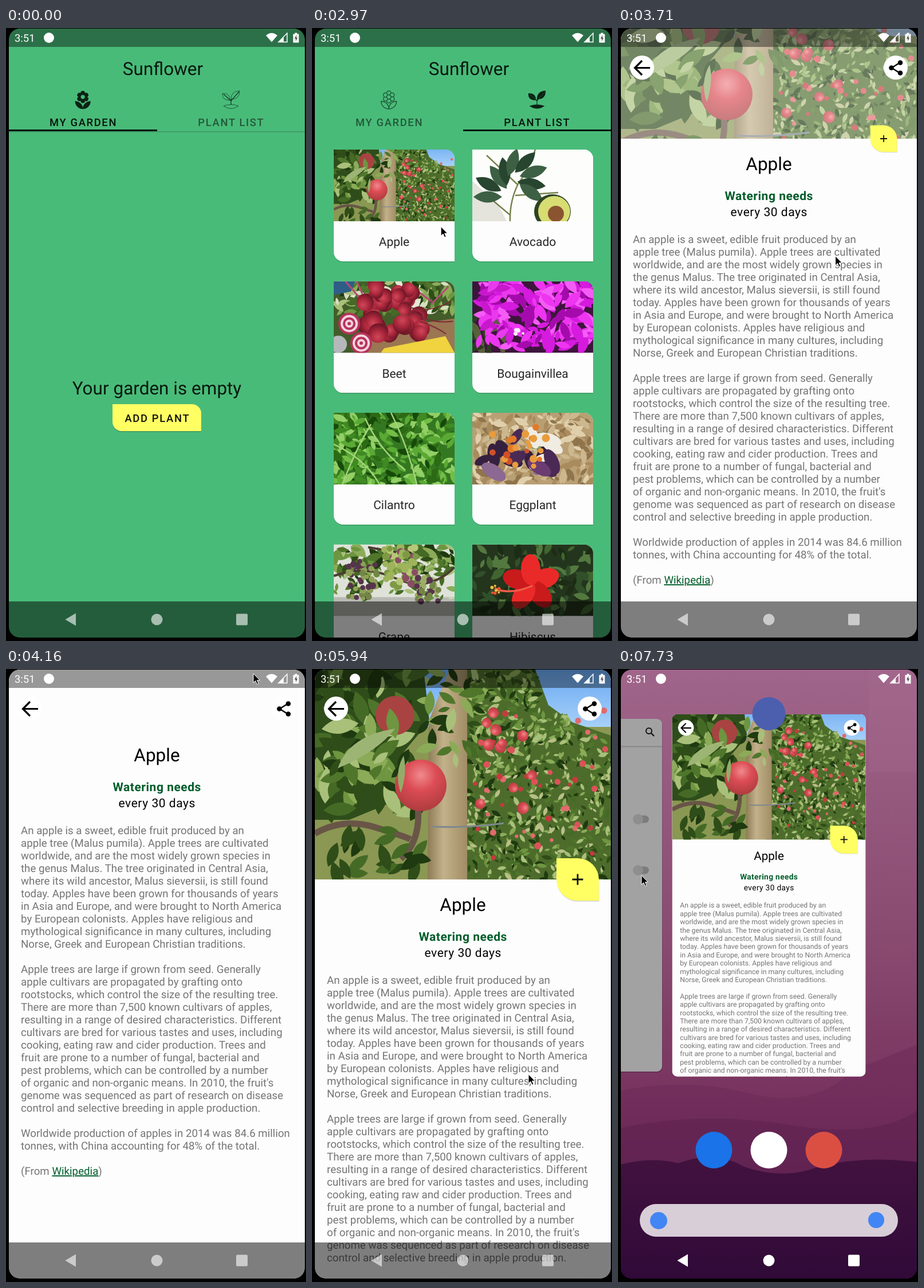
Write an HTML page that moves like this. It is 524 px wide and 1069 px high and loops after 8000 ms.

```html
<!DOCTYPE html>
<html lang="en">
<head>
<meta charset="utf-8">
<title>Garden app</title>
<style>
html, body { margin: 0; width: 100%; height: 100%; overflow: hidden; background: #000; }
svg { display: block; }
text { font-family: Roboto, "Noto Sans", sans-serif; text-rendering: geometricPrecision; }
.caps { font-size: 18.4px; font-weight: 500; letter-spacing: 1.65px; text-anchor: middle; }
.head { font-size: 31.5px; text-anchor: middle; }
.label { font-size: 21px; text-anchor: middle; fill: #272727; }
.sub { font-size: 21px; letter-spacing: .53px; text-anchor: middle; }
.copy { font-size: 18.73px; fill: #757575; }
</style>
</head>
<body>
<svg id="stage" width="524" height="1069" viewBox="0 0 524 1069"></svg>
<script>
const LOOP = 8000;
const GREEN = '#49bb79', YELLOW = '#ffff63', INK = '#0b2114', LINK = '#005d2b';

const rect = (x, y, w, h, fill, extra = '') => `<rect x="${x}" y="${y}" width="${w}" height="${h}" fill="${fill}" ${extra}/>`;
const circle = (x, y, r, fill, extra = '') => `<circle cx="${x}" cy="${y}" r="${r}" fill="${fill}" ${extra}/>`;
const path = (d, fill, extra = '') => `<path d="${d}" fill="${fill}" ${extra}/>`;
const line = (d, color, width) => path(d, 'none', `stroke="${color}" stroke-width="${width}"`);
const text = (x, y, cls, str, extra = '') => `<text x="${x}" y="${y}" class="${cls}" ${extra}>${str}</text>`;
const repeat = (n, make) => Array.from({ length: n }, (_, i) => make(i)).join('');

function random(seed) {
  const next = () => (seed = seed * 16807 % 2147483647) / 2147483647;
  next(); next();
  return next;
}

const LEAF = 'M-1 0Q0 -.8 1 0Q0 .8 -1 0';
const DOT = 'M-1 0A1 1 0 1 1 1 0A1 1 0 1 1 -1 0';
const OVAL = 'M-1 0A1 .5 0 1 1 1 0A1 .5 0 1 1 -1 0';

// Strews one unit shape over a box with random place, size, turn and colour.
function strew(shape, seed, count, [x, y, w, h], [small, big], colors) {
  const rnd = random(seed);
  return repeat(count, () => {
    const px = x + rnd() * w, py = y + rnd() * h;
    const r = small + rnd() * (big - small);
    const turn = rnd() * 360;
    const fill = colors[Math.floor(rnd() * colors.length)];
    return path(shape, fill, `transform="translate(${px.toFixed(1)} ${py.toFixed(1)}) rotate(${turn.toFixed(0)}) scale(${r.toFixed(1)})"`);
  });
}

const DARK = ['#1f3a10', '#2f4d18', '#456a26'];
const FRESH = ['#4f762b', '#6e9540', '#8bab58', '#a9c07a'];
const BOTH = [...DARK, ...FRESH];
const ALL = [0, 0, 211, 125];

const candy = (x, y) => repeat(5, i => circle(x, y, 19 - 4 * i, i % 2 ? '#f3d6dd' : '#b8325d'));

const photos = {
  apple: rect(0, 0, 517, 366, 'url(#sky)') +
    rect(0, 100, 517, 266, '#8a9853') +
    path('M250 0H385L408 62L450 92L517 115V366H250Z', '#4d6c2c') +
    strew(LEAF, 11, 650, [265, 115, 252, 250], [4, 10], [...BOTH, '#b9bf86']) +
    strew(LEAF, 12, 170, [268, 0, 125, 125], [5, 13], BOTH) +
    strew(LEAF, 13, 45, [385, 75, 70, 45], [4, 9], FRESH) +
    strew(DOT, 14, 45, [275, 70, 235, 260], [3, 6], ['#c8393f', '#dd5258', '#e26a6c']) +
    strew(DOT, 5, 11, [285, 60, 100, 190], [8, 11], ['url(#fruit)']) +
    path('M235 0H266V366H197L199 90Z', 'url(#wood)') +
    line('M205 274Q270 276 330 268', '#7d8890', 3) +
    path('M0 0H190L200 90L150 150V225L60 262H0Z', '#2f4d1b') +
    strew(LEAF, 15, 90, [0, 0, 190, 245], [14, 34], BOTH) +
    strew(LEAF, 16, 26, [185, 0, 100, 160], [10, 22], BOTH) +
    circle(140, 80, 34, '#a84342') +
    strew(LEAF, 17, 22, [30, 90, 120, 120], [16, 34], BOTH) +
    line('M0 286Q50 258 105 275T167 296M150 330Q185 300 180 240', '#695547', 11) +
    strew(LEAF, 18, 22, [30, 275, 155, 85], [14, 26], DARK) +
    circle(185, 202, 45, 'url(#fruit)') +
    path('M150 215Q138 180 155 150Q162 180 150 215', '#91ad68') +
    path('M40 172Q60 115 140 103Q110 143 40 172', '#9db574'),

  avocado: rect(...ALL, '#fdfdfb') + path('M0 55L45 95L60 125H0Z', '#e4e3dc') +
    line('M66 125Q65 90 80 60Q95 40 110 0M67 115L35 88M75 80L150 75M80 62L25 10', '#77824d', 2.5) +
    repeat(9, i => path(LEAF, i % 2 ? '#28452f' : '#3d6044', `transform="translate(72 66) rotate(${160 + i * 27}) translate(${48 - i * i % 5 * 4} 0) rotate(20) scale(25)"`)) +
    `<ellipse cx="140" cy="108" rx="32" ry="30" fill="#2e4321"/><ellipse cx="143" cy="108" rx="28" ry="27" fill="#d7dc73"/>` + circle(146, 112, 14, '#8b5431'),

  beet: rect(...ALL, '#435c2a') + strew(LEAF, 21, 120, [0, 0, 211, 55], [6, 16], [...BOTH, '#d7dec0', '#e5e8d4']) +
    path('M0 0H38L30 18L0 24Z', '#2e5d86') + path('M50 88L211 65V125H60Z', '#9a7652') +
    line('M55 40L20 0M60 45L40 0M60 40L75 5M170 35L130 5M170 40L200 10', '#b74a73', 3) +
    strew(DOT, 22, 26, [48, 30, 105, 62], [12, 17], ['url(#bulb)']) +
    strew(DOT, 23, 8, [70, 5, 110, 25], [11, 15], ['url(#bulb)']) +
    line('M125 42Q160 60 205 35M140 55Q170 75 208 70M150 70Q180 80 196 92', '#7d2a36', 2) +
    circle(8, 110, 15, '#b5b8bb') + candy(27, 74) + candy(48, 108) +
    path('M82 125L88 117L195 96L211 125Z', '#f0d33f'),

  bougainvillea: rect(...ALL, '#3d153c') + strew(LEAF, 31, 25, [0, 60, 60, 65], [8, 17], ['#2f3b22', '#59603b']) +
    strew(LEAF, 32, 170, [18, 0, 195, 115], [9, 22], ['#a50bac', '#d51bdd', '#ee35f0', '#f45cf6']) +
    strew(LEAF, 33, 12, [0, 5, 60, 100], [9, 18], ['#c818cc', '#e93aee']) +
    strew(DOT, 34, 5, [75, 84, 20, 12], [2, 4], ['#fbf0ff']),

  cilantro: rect(...ALL, '#347721') +
    strew(LEAF, 41, 330, ALL, [5, 15], ['#174a0a', '#2c6a14', '#3f8a22', '#59a934', '#73bd47', '#92cf66']) +
    line('M0 55Q55 80 80 125M55 10Q80 65 125 100M100 0Q130 60 145 125M15 125Q40 60 65 20', '#a4d37a', 2.5),

  eggplant: rect(...ALL, '#b99f74') +
    strew(LEAF, 51, 260, ALL, [5, 15], ['#8f744c', '#cdb78e', '#a98b5d', '#e0cfab']) +
    strew(OVAL, 54, 22, [15, 35, 130, 70], [13, 24], ['#36203f', '#4a2a54', '#6b3c72', '#8b6992', '#f0ece2', '#879b57']) +
    strew(DOT, 52, 22, [35, 25, 100, 70], [4, 7], ['#e37a26', '#d0512a', '#e99c3d']),

  grape: rect(...ALL, '#dfe2d8') + rect(0, 92, 211, 33, '#b9bab4') +
    strew(LEAF, 61, 110, [0, 0, 211, 45], [7, 18], BOTH) +
    strew(LEAF, 62, 60, [0, 40, 211, 55], [5, 13], [...BOTH, '#cbd8ae']) +
    line('M0 55Q55 35 110 60T211 40M60 5L145 20', '#4b3d30', 4) +
    strew(DOT, 63, 45, [25, 28, 50, 65], [4, 6], ['#57344d', '#728546', '#8fa058']) +
    strew(DOT, 64, 60, [88, 5, 58, 70], [5, 7], ['#9db45b', '#b6c878', '#7d9a43', '#894d62']) +
    strew(DOT, 65, 35, [145, 55, 38, 45], [4, 6], ['#57344d', '#728546', '#9cae67']),

  hibiscus: rect(...ALL, '#24351d') + strew(LEAF, 71, 110, ALL, [7, 17], ['#1c2c15', '#31502a', '#40652f', '#54793f']) +
    repeat(5, i => path(OVAL, i % 2 ? '#c91a1c' : '#ea2a28', `transform="translate(103 68) rotate(${-20 + i * 72}) translate(24 0) scale(27 34)"`)) +
    line('M105 72Q70 88 40 78', '#f05a4a', 3.5) + strew(DOT, 72, 9, [34, 72, 14, 13], [1.5, 3], ['#f4c146', '#e2542c'])
};

const CARD = 'M0 0H195A16 16 0 0 1 211 16V195H16A16 16 0 0 1 0 179Z';
const BUTTON = 'M186 656H325A16 16 0 0 1 341 672V703H202A16 16 0 0 1 186 687Z';
const FAB = 'M-37 -37H0A37 37 0 0 1 37 0V37H0A37 37 0 0 1 -37 0Z';
const BASE = 'M12 22A9 9 0 0 0 21 13A9 9 0 0 0 12 22A9 9 0 0 0 3 13A9 9 0 0 0 12 22Z';
const SPROUT = 'M378 114Q377 126 391 126Q391 113 378 114ZM408 109.5Q393 110 393 124Q408 125 408 109.5ZM380 136Q393 131 406 136Q393 145 380 136Z';

const flower = `<g transform="translate(116.3 108.3) scale(1.49)"><path d="${BASE}"/>` +
  repeat(6, i => `<circle cx="12" cy="3.5" r="2.5" transform="rotate(${60 * i} 12 8)"/>`) +
  circle(12, 8, 2.5, GREEN) + '</g>';
const sprout = `<path d="${SPROUT}"/>` + line('M380 115.5L393 127L407 111M393 124V134', '#123a24', 1.3);
const tab = (id, x, name, icon) => `<g id="${id}">${icon}${text(x, 171, 'caps', name, 'stroke="none" fill="#06140c"')}</g>`;

function card(name, i) {
  const x = 38 + i % 2 * 242, y = 212 + Math.floor(i / 2) * 229.5;
  const id = name.toLowerCase();
  const box = id === 'apple' ? '0 0 517 366' : '0 0 211 125';
  return `<g transform="translate(${x} ${y})">${path(CARD, '#000', 'opacity=".15" transform="translate(0 1.5)"')}
    <g clip-path="url(#card)">${rect(0, 0, 211, 195, '#fdfdfd')}
    <svg width="211" height="125" viewBox="${box}" preserveAspectRatio="xMidYMid slice"><use href="#${id}"/></svg></g>
    ${text(105.5, 168, 'label', name)}</g>`;
}

const names = ['Apple', 'Avocado', 'Beet', 'Bougainvillea', 'Cilantro', 'Eggplant', 'Grape', 'Hibiscus'];

const copy = `An apple is a sweet, edible fruit produced by an
apple tree (Malus pumila). Apple trees are cultivated
worldwide, and are the most widely grown species in
the genus Malus. The tree originated in Central Asia,
where its wild ancestor, Malus sieversii, is still found
today. Apples have been grown for thousands of years
in Asia and Europe, and were brought to North America
by European colonists. Apples have religious and
mythological significance in many cultures, including
Norse, Greek and European Christian traditions.

Apple trees are large if grown from seed. Generally
apple cultivars are propagated by grafting onto
rootstocks, which control the size of the resulting tree.
There are more than 7,500 known cultivars of apples,
resulting in a range of desired characteristics. Different
cultivars are bred for various tastes and uses, including
cooking, eating raw and cider production. Trees and
fruit are prone to a number of fungal, bacterial and
pest problems, which can be controlled by a number
of organic and non-organic means. In 2010, the fruit's
genome was sequenced as part of research on disease
control and selective breeding in apple production.

Worldwide production of apples in 2014 was 84.6 million
tonnes, with China accounting for 48% of the total.

(From <tspan fill="${LINK}" text-decoration="underline">Wikipedia</tspan>)`;

const stops = list => list.map(([o, c]) => `<stop offset="${o}" stop-color="${c}"/>`).join('');
const across = (id, ...list) => `<linearGradient id="${id}">${stops(list)}</linearGradient>`;
const down = (id, ...list) => `<linearGradient id="${id}" x2="0" y2="1">${stops(list)}</linearGradient>`;
const ball = (id, ...list) => `<radialGradient id="${id}" cx=".5" cy=".3" r=".75">${stops(list)}</radialGradient>`;

const defs = `<defs>
  ${down('sky', [0, '#69a9f2'], [.4, '#c3e2fc'])}
  ${across('wood', [0, '#8d7b55'], [.4, '#c2b18a'], [1, '#a18d65'])}
  ${down('wall', [0, '#a0658a'], [.45, '#894a70'], [.7, '#78345f'], [.82, '#622354'])}
  ${down('hill', [0, '#42123f'], [1, '#300a38'])}
  ${down('shade', [0, 'rgba(0,0,0,.2)'], [1, 'rgba(0,0,0,0)'])}
  ${ball('fruit', [0, '#f08a8c'], [.4, '#dc4c55'], [1, '#a83a3c'])}
  ${ball('bulb', [0, '#d2475a'], [.5, '#a8263a'], [1, '#5c1322'])}
  <clipPath id="screen">${rect(5, 1, 517, 1062, '#fff', 'rx="19"')}</clipPath>
  <clipPath id="frame"><rect id="crop" x="5" width="517"/></clipPath>
  <clipPath id="card">${path(CARD, '#fff')}</clipPath>
  ${Object.entries(photos).map(([id, art]) => `<g id="${id}">${art}</g>`).join('')}
</defs>`;

const home = `<g id="home">${rect(5, 1, 517, 1062, GREEN)}
  <g id="pager">
    ${rect(5, 180, 517, 3, 'url(#shade)', 'id="edge"')}
    ${text(263.5, 639, 'head', 'Your garden is empty', 'fill="#08180f"')}
    ${path(BUTTON, '#000', 'opacity=".2" transform="translate(0 1.5)"')}${path(BUTTON, YELLOW)}
    ${text(264.3, 686.5, 'caps', 'ADD PLANT', 'fill="#10100a"')}
    <g transform="translate(517 0)">${names.map(card).join('')}</g>
  </g>
  ${text(274, 82, 'head', 'Sunflower', 'fill="#08180f"')}
  ${tab('garden', 135, 'MY GARDEN', flower)}
  ${tab('plants', 393.4, 'PLANT LIST', sprout)}
  ${rect(5, 177, 259, 3, '#06140c', 'id="marker"')}
</g>`;

const detail = `<g id="detail">${rect(5, 1, 517, 1062, '#fdfdfd')}
  <g id="body">
    ${text(263.5, 421.5, 'head', 'Apple')}
    ${text(263.7, 474, 'sub', 'Watering needs', `font-weight="700" fill="${LINK}"`)}
    ${text(263.7, 502, 'sub', 'every 30 days')}
    ${copy.split('\n').map((s, i) => text(26, 549 + 22 * i, 'copy', s)).join('')}
  </g>
  <svg id="header" x="5" y="1" width="517">${rect(0, 0, 517, 366, '#fdfdfd')}<use id="photo" href="#apple"/></svg>
  <g id="fab">${path(FAB, '#000', 'opacity=".16" transform="translate(.5 1.5)"')}${path(FAB, YELLOW)}${line('M-9.5 0H9.5M0 -9.5V9.5', '#111', 2.8)}</g>
  ${circle(42, 69, 21, '#fff')}${circle(485, 69, 21, '#fff')}
  ${line('M56 69.5H31M42 57L29.5 69.5L42 82', '#000', 3.2)}
  ${line('M493 60L478 69.5L493 79', '#000', 2.4)}
  ${repeat(3, i => circle(i === 1 ? 477.5 : 493, 60.5 + 9 * i, 4.3, '#000'))}
</g>`;

const toggle = y => rect(30, y - 6.5, 24, 13, '#7c7c7c', 'rx="6.5"') + circle(35, y, 9, '#8e8e8e');

const launcher = `<g id="launcher">${rect(5, 1, 517, 1062, 'url(#wall)')}
  ${rect(438, 1, 84, 179, '#a96d91', 'opacity=".25"')}
  ${path('M5 735Q120 712 230 740T410 700L522 655V900H5Z', '#6d2a59', 'opacity=".55"')}
  ${path('M5 800Q150 770 300 795T522 770V900H5Z', '#5c204f', 'opacity=".5"')}
  ${path('M5 864Q60 850 105 862Q170 838 220 868Q290 892 350 868Q430 848 522 860V1063H5Z', 'url(#hill)')}
  <g id="dock">
    ${['#1a73e8', '#fff', '#db4f43'].map((c, i) => circle(167.5 + 96 * i, 839, 32, c)).join('')}
    ${rect(38, 933, 451, 57, '#d8ced7', 'rx="28.5"')}${circle(71, 962, 15, '#4285f4')}${circle(451, 961, 14, '#4285f4')}
  </g>
  <g id="side">
    ${rect(-80, 89, 158, 615, '#000', 'rx="9" opacity=".15"')}${rect(-80, 87, 157, 615, '#a2a2a2', 'rx="9"')}
    ${rect(-80, 134, 157, 2.5, '#8d8d8d')}
    ${circle(54, 108, 5, 'none', 'stroke="#111" stroke-width="2"')}${line('M57.5 111.5L63 117', '#111', 2.3)}
    ${toggle(262)}${toggle(351)}
  </g></g>`;

const system = `${text(15, 24, '', '3:51', 'font-size="18.4" fill="#fff"')}${circle(75, 17, 9, '#fff')}
  ${path('M454 13Q464 4.5 474 13L464 24.5Z', '#fff')}
  ${path('M491 9V24.5H476Z', 'none', 'stroke="#fff" stroke-width="1.5"')}${path('M485 15V24.5H476Z', '#fff')}
  ${path('M504.5 8.5H508.5V10.5H511.5V25.5H501.5V10.5H504.5Z', '#fff')}${path('M507.5 12L503.8 18.5H506V23L509.3 16.8H507.2Z', '#555')}
  <g id="nav">${path('M103.5 1031.5L122 1020.5V1042.5Z', '#fff')}${circle(263.5, 1031.5, 10, '#fff')}${rect(402, 1021.5, 20, 20, '#fff', 'rx="2"')}</g>`;

document.getElementById('stage').innerHTML = `${defs}${rect(0, 0, 524, 1069, '#000')}
  <g clip-path="url(#screen)">${launcher}
    <g id="window" clip-path="url(#frame)">${home}${detail}
      ${rect(5, 1, 517, 32, '#000', 'opacity=".4"')}${rect(5, 1000, 517, 63, '#000', 'opacity=".5"')}</g>
    <g id="badge">${circle(263.5, 78, 29, '#4c5eae')}</g>${system}</g>
  ${path('M0 0V16L3.8 12.6L6.5 18.6L9 17.5L6.5 11.7H11.5Z', '#000', 'id="cursor" stroke="#fff"')}`;

const $ = id => document.getElementById(id);
const set = (id, attrs) => { for (const a in attrs) $(id).setAttribute(a, attrs[a]); };
const show = (id, on) => set(id, { display: on ? 'inline' : 'none' });

const ramp = (x, from, to) => Math.min(1, Math.max(0, (x - from) / (to - from)));
const smooth = u => u * u * (3 - 2 * u);
const easeOut = u => 1 - (1 - u) ** 3;

// Pointer stops: arrival step and place. The pointer glides between them.
const stopsAt = [[0, 368, 664], [2, 247, 671], [5, 247, 671], [10, 215, 335], [13, 254, 379], [15, 370, 470],
  [19, 432, 8], [21, 432, 8], [23, 405, 405], [26, 375, 632], [29, 375, 660], [38, 399, 1030], [43, 41, 360]];

function pointer(step) {
  const next = Math.max(1, stopsAt.findIndex(s => s[0] >= step));
  const [t0, x0, y0] = stopsAt[next - 1], [t1, x1, y1] = stopsAt[next];
  const u = smooth(ramp(step, t0, t1));
  return `translate(${x0 + (x1 - x0) * u} ${y0 + (y1 - y0) * u})`;
}

function drawTab(id, active) {
  set(id, { fill: active ? INK : GREEN, stroke: active ? INK : '#1d5c39', 'stroke-width': active ? .3 : 1 });
  $(id).querySelector('text').setAttribute('opacity', active ? 1 : .58);
}

function draw(t) {
  // The screen refreshes in even steps once the pointer arrives.
  const step = t < 1340 ? -1 : Math.floor((t - 1328) / 148.6);
  const listed = step >= 4, open = step >= 12;

  show('home', !open);
  show('detail', open);
  set('pager', { transform: `translate(${-517 * easeOut(ramp(step, 3, 5.6))} 0)` });
  show('edge', !listed);
  set('marker', { x: listed ? 264 : 5 });
  drawTab('garden', !listed);
  drawTab('plants', listed);

  const scroll = 261 * (ramp(step, 14, 17) - ramp(step, 23, 26.45));
  const veil = ramp(step, 15, 18) - ramp(step, 23, 25.5);
  set('body', { transform: `translate(0 ${-scroll})` });
  set('header', { height: 366 - scroll });
  set('photo', { y: -scroll / 2, opacity: ramp(step, 12, 14.4) * (1 - veil) });
  set('fab', { transform: `translate(464 ${367 - scroll}) scale(${1 - ramp(scroll, 150, 215)})` });

  const shrink = smooth(ramp(step, 38, 42));
  const top = 1 + 32 * shrink;
  set('crop', { y: top, height: 1062 - 96 * shrink, rx: 19 - 5 * shrink });
  set('window', { transform: `translate(${5 + 89.5 * shrink} ${1 + 78 * shrink}) scale(${1 - .346 * shrink}) translate(-5 ${-top})` });
  show('launcher', shrink > 0);
  set('dock', { opacity: shrink });
  set('side', { transform: `translate(${-100 * (1 - shrink)} 0)` });
  set('badge', { opacity: ramp(shrink, .5, 1) });

  set('nav', { opacity: .6 + .4 * ramp(step, 31, 33) });
  show('cursor', step >= 0);
  set('cursor', { transform: pointer(step) });
}

function loop() {
  draw(performance.now() % LOOP);
  requestAnimationFrame(loop);
}
loop();
</script>
</body>
</html>
```
